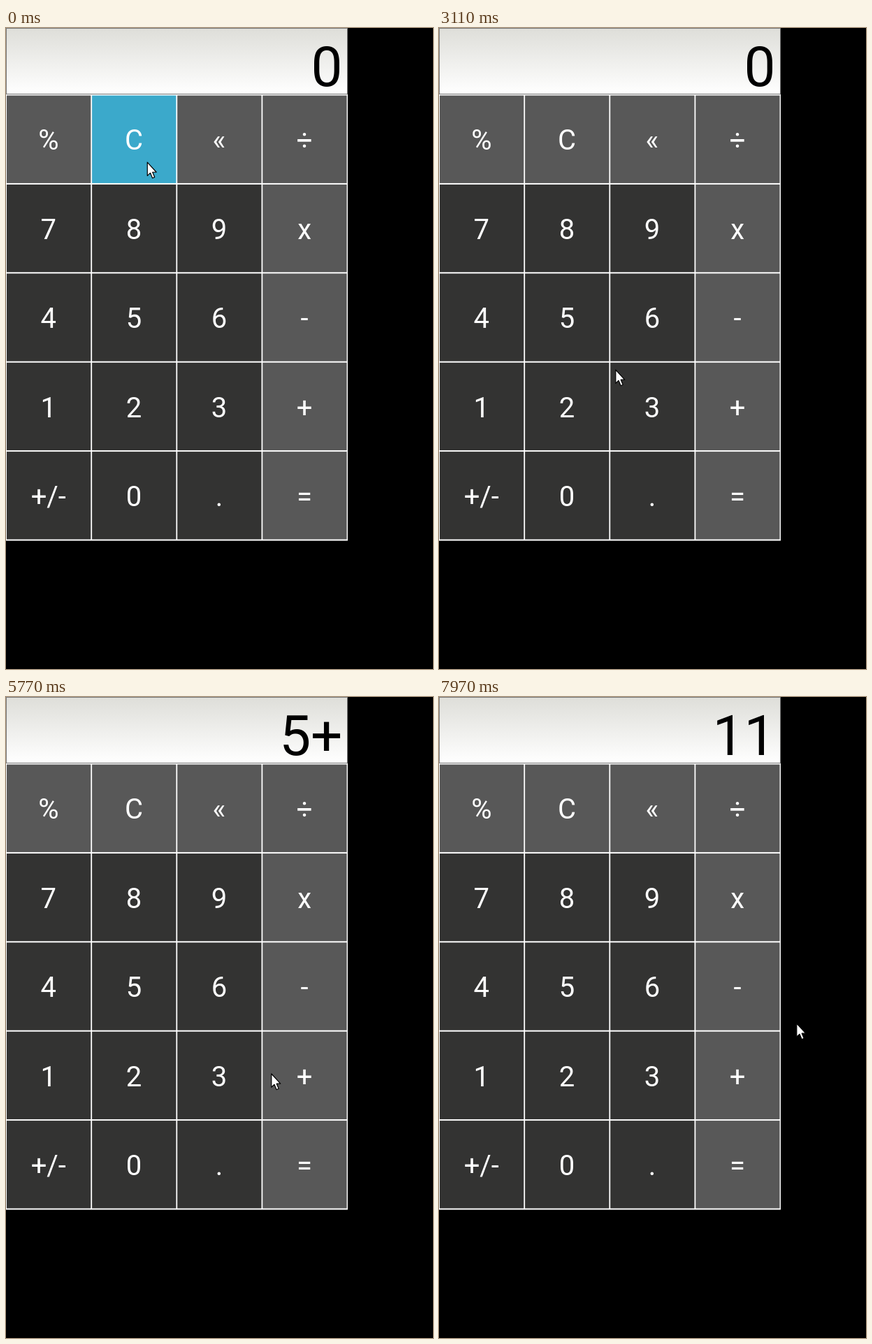
An HTML page for the animation above (8000 ms loop, 611 by 917 pixels).

```html
<!DOCTYPE html>
<html lang="en">
<head>
<meta charset="utf-8">
<title>Calculator</title>
<style>
  html, body { margin: 0; width: 100%; height: 100%; overflow: hidden; background: #000; }
  svg { display: block; width: 100vw; height: 100vh; }
  text { font-family: Roboto, sans-serif; }
  .key text { font-size: 40px; fill: #fff; text-anchor: middle; }
  .digit rect { fill: #333332; }
  .operator rect { fill: #585858; }
  .key.pressed rect { fill: #3ba9cb; }
  #readout { font-size: 80px; text-anchor: end; }
</style>
</head>
<body>
<svg viewBox="0 0 611 917">
  <defs>
    <linearGradient id="glass" x2="0" y2="1">
      <stop offset="0" stop-color="#deded9"/>
      <stop offset="1" stop-color="#fff"/>
    </linearGradient>
  </defs>
  <rect width="489" height="733.5" fill="#fff"/>
  <rect x=".5" y=".5" width="488" height="94" fill="url(#glass)" stroke="#777"/>
  <text id="readout" x="481.5"></text>
  <g id="keys"></g>
  <path id="cursor" d="M.8 1 V20.3 L5 16.3 L8.1 23.7 L11.2 22.3 L8.2 15.2 H13.7 Z"
    fill="#fff" stroke="#000" stroke-width="1.2" stroke-linejoin="round"/>
</svg>
<script>
const LOOP = 8000, HOLD = 300, LINGER = 100;
const COLUMN = 122.1, ROW = 127.4, TOP = 95.5;
const labels = '% C « ÷ 7 8 9 x 4 5 6 - 1 2 3 + +/- 0 . ='.split(' ');

const board = document.getElementById('keys');
const readout = document.getElementById('readout');
const cursor = document.getElementById('cursor');

const add = (parent, tag, attributes) => {
  const node = document.createElementNS('http://www.w3.org/2000/svg', tag);
  for (const name in attributes) node.setAttribute(name, attributes[name]);
  return parent.appendChild(node);
};

const keys = {};
labels.forEach((label, i) => {
  const column = i % 4, row = Math.floor(i / 4);
  const x = column * COLUMN, y = TOP + row * ROW;
  const kind = row && column < 3 ? 'digit' : 'operator';
  const node = add(board, 'g', { class: `key ${kind}` });
  add(node, 'rect', { x: x + 1, y: y + 1, width: COLUMN - 1.8, height: ROW - 2 });
  add(node, 'text', { x: x + 60.8, y: y + 78.8 }).textContent = label;
  keys[label] = { node, x, y };
});

const stops = [], presses = [];
const glide = (time, x, y) => stops.push({ time, x, y });

// The pointer rests on the lower right of a key while pressing it.
function press(time, label, result) {
  const { node, x, y } = keys[label];
  const tip = [x + COLUMN * .65, y + ROW * .75];
  glide(time, ...tip);
  glide(time + LINGER, ...tip);
  presses.push({ time, node, result });
}

press(0, 'C', '0');
glide(890, 614, 240);
glide(1350, 614, 420);
glide(3110, 252, 488);
press(3400, '5', '5');
press(4650, '+', '5+');
glide(4930, 525, 683);
glide(5770, 379, 538);
press(6000, '6', '5+6');
glide(6630, 522, 795);
press(7180, '=', '11');
glide(7970, 511, 466);

const smooth = u => u * u * (3 - 2 * u);

function pointerAt(time) {
  const from = stops.findLast(stop => stop.time <= time);
  const to = stops.find(stop => stop.time > time) || from;
  const u = to === from ? 0 : smooth((time - from.time) / (to.time - from.time));
  return [from.x + (to.x - from.x) * u, from.y + (to.y - from.y) * u];
}

function draw() {
  const time = performance.now() % LOOP;
  const latest = presses.findLast(step => step.time <= time);
  for (const step of presses)
    step.node.classList.toggle('pressed', step === latest && time < step.time + HOLD);
  readout.textContent = latest.result;
  readout.setAttribute('y', latest.result.length > 2 ? 70.3 : 83);
  cursor.setAttribute('transform', `translate(${pointerAt(time)})`);
  requestAnimationFrame(draw);
}
draw();
</script>
</body>
</html>
```
